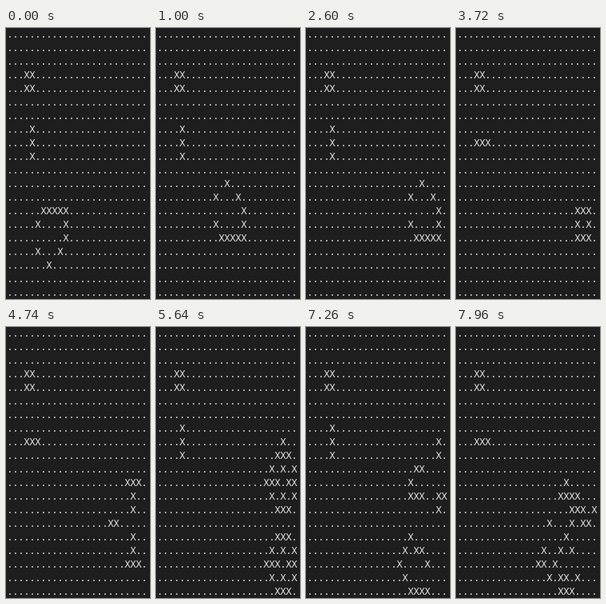
Animation, 180 px wide and 339 px high, one loop 8000 ms. Source, as an HTML page with a canvas:

```html
<!DOCTYPE html>
<html lang="en">
<head>
<meta charset="utf-8">
<title>Game of Life</title>
<style>
html, body { margin: 0; width: 100%; height: 100%; overflow: hidden; background: #1e1e1e; }
canvas { display: block; }
</style>
</head>
<body>
<canvas id="stage" width="180" height="339"></canvas>
<script>
const COLS = 25, ROWS = 20, STEPS = 80, LOOP = 8000;
const PITCH_X = 7, PITCH_Y = 17;
const LONG_HOLDS = [27, 40, 66]; // generations that stay 20 ms longer
const ctx = document.getElementById('stage').getContext('2d', { alpha: false });

function emptyGrid() {
  return Array.from({ length: ROWS }, () => new Array(COLS).fill(0));
}

function place(grid, col, row, pattern) {
  pattern.forEach((line, y) => [...line].forEach((ch, x) => {
    if (ch === 'X') grid[row + y][col + x] = 1;
  }));
}

// Cells outside the grid count as dead.
function nextGrid(grid) {
  const alive = (r, c) => (grid[r] && grid[r][c]) || 0;
  return grid.map((line, r) => line.map((cell, c) => {
    let n = -cell;
    for (let y = -1; y <= 1; y++)
      for (let x = -1; x <= 1; x++) n += alive(r + y, c + x);
    return n === 3 || (cell && n === 2) ? 1 : 0;
  }));
}

const first = emptyGrid();
place(first, 3, 3, ['XX', 'XX']);
place(first, 4, 7, ['X', 'X', 'X']);
place(first, 5, 13, ['.XXXXX', 'X....X', '.....X', 'X...X.', '..X...']);

const generations = [first];
while (generations.length < STEPS) generations.push(nextGrid(generations.at(-1)));

function startOf(g) {
  return 100 * g + 20 * LONG_HOLDS.filter(h => h < g).length;
}

function generationAt(t) {
  let g = Math.min(STEPS - 1, Math.floor(t / 100));
  while (startOf(g) > t) g--;
  return g;
}

function draw(grid) {
  ctx.fillStyle = '#1e1e1e';
  ctx.fillRect(0, 0, 180, 339);
  ctx.fillStyle = '#dcdcdc';
  ctx.font = '12.2px "DejaVu Sans Mono", monospace';
  ctx.textAlign = 'center';
  ctx.textRendering = 'geometricPrecision';
  grid.forEach((line, r) => line.forEach((cell, c) => {
    ctx.fillText(cell ? 'X' : '.', 5 + c * PITCH_X, 12 + r * PITCH_Y);
  }));
}

function frame(now) {
  draw(generations[generationAt(now % LOOP)]);
  requestAnimationFrame(frame);
}
draw(first);
requestAnimationFrame(frame);
</script>
</body>
</html>
```
